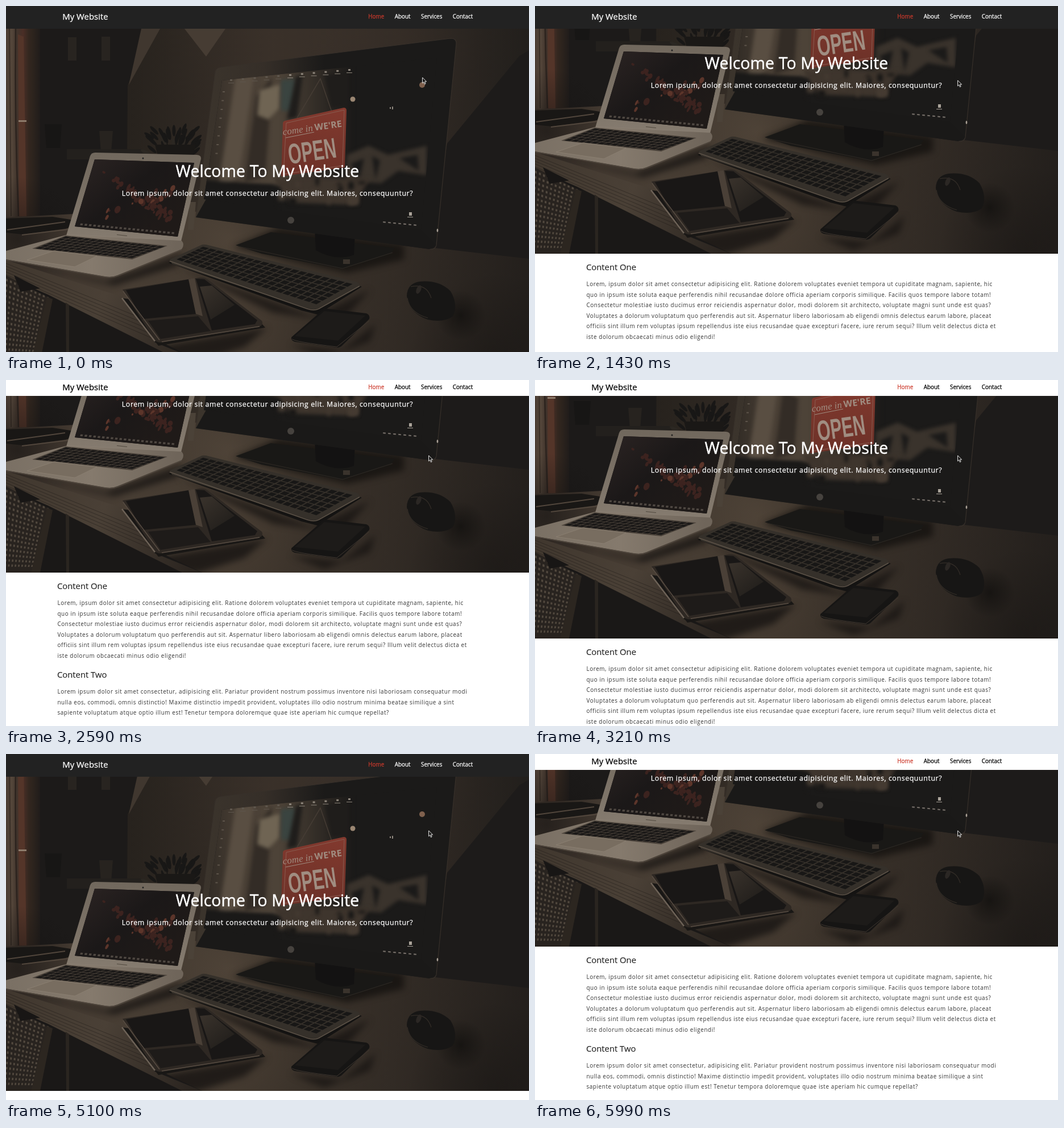
These frames come from a looping animation (920 px wide and 609 px high, 6260 ms). An HTML page with a canvas:

```html
<!DOCTYPE html>
<html lang="en">
<head>
<meta charset="utf-8">
<title>My Website</title>
<style>
html, body { margin: 0; width: 100%; height: 100%; overflow: hidden; background: #fff; }
body { font-family: "Open Sans", "Noto Sans", sans-serif; }
#stage { position: relative; width: 920px; height: 609px; overflow: hidden; background: #fff; }
#page { position: absolute; left: 0; top: 0; width: 920px; height: 920px; }
#photo { position: absolute; left: 0; top: 0; }
h1, h2, p { position: absolute; margin: 0; font-weight: 400; white-space: nowrap; }
h1, .lead { left: 0; width: 920px; text-align: center; color: #fff; }
h1 { top: 270px; font-size: 28.37px; line-height: 40px; letter-spacing: .13px; -webkit-text-stroke: .45px; }
.lead { top: 320px; font-size: 12.33px; line-height: 20px; letter-spacing: .625px; -webkit-text-stroke: .25px; }
h2 { left: 90px; font-size: 14.8px; line-height: 20px; color: #222; -webkit-text-stroke: .15px; }
.text { left: 90.4px; font-size: 9.87px; line-height: 18.5px; letter-spacing: .617px; color: #333; }
#nav { position: absolute; left: 0; top: 0; width: 920px; overflow: hidden; -webkit-text-stroke: .25px; }
#bar { position: absolute; left: 0; top: 0; width: 920px; height: 40px; }
.logo { position: absolute; left: 99.3px; top: 8px; font-size: 14.8px; line-height: 20px; letter-spacing: .05px; }
.links { position: absolute; left: 637.3px; top: 7.5px; display: flex; gap: 18.5px; font-size: 9.87px; line-height: 20px; }
.links .current { color: #cc3a2c; }
#cursor { position: absolute; left: 0; top: 0; }
</style>
</head>
<body>
<div id="stage">
  <div id="page">
    <canvas id="photo" width="920" height="626"></canvas>
    <h1>Welcome To My Website</h1>
    <p class="lead">Lorem ipsum, dolor sit amet consectetur adipisicing elit. Maiores, consequuntur?</p>
    <h2 style="top:639px">Content One</h2>
    <p class="text" style="top:670px">Lorem, ipsum dolor sit amet consectetur adipisicing elit. Ratione dolorem voluptates eveniet tempora ut cupiditate magnam, sapiente, hic<br>quo in ipsum iste soluta eaque perferendis nihil recusandae dolore officia aperiam corporis similique. Facilis quos tempore labore totam!<br>Consectetur molestiae iusto ducimus error reiciendis aspernatur dolor, modi dolorem sit architecto, voluptate magni sunt unde est quas?<br>Voluptates a dolorum voluptatum quo perferendis aut sit. Aspernatur libero laboriosam ab eligendi omnis delectus earum labore, placeat<br>officiis sint illum rem voluptas ipsum repellendus iste eius recusandae quae excepturi facere, iure rerum sequi? Illum velit delectus dicta et<br>iste dolorum obcaecati minus odio eligendi!</p>
    <h2 style="top:795px">Content Two</h2>
    <p class="text" style="top:826px">Lorem ipsum dolor sit amet consectetur, adipisicing elit. Pariatur provident nostrum possimus inventore nisi laboriosam consequatur modi<br>nulla eos, commodi, omnis distinctio! Maxime distinctio impedit provident, voluptates illo odio nostrum minima beatae similique a sint<br>sapiente voluptatum atque optio illum est! Tenetur tempora doloremque quae iste aperiam hic cumque repellat?</p>
  </div>
  <div id="nav"><div id="bar">
    <div class="logo">My Website</div>
    <div class="links"><span class="current">Home</span><span>About</span><span>Services</span><span>Contact</span></div>
  </div></div>
  <svg id="cursor" width="9" height="14"><path d="M.6 .9V10.8L2.9 8.7 4.4 12.5 6.1 11.8 4.6 8.1H7.6Z" fill="#161514" stroke="#fff" stroke-width=".9"/></svg>
</div>
<script>
const $ = id => document.getElementById(id);
const g = $('photo').getContext('2d');

let seed = 7;
const rnd = () => (seed = (seed * 16807) % 2147483647) / 2147483647;

const shape = (fill, d) => { g.fillStyle = fill; g.fill(new Path2D(d)); };
const line = (color, w, d) => { g.strokeStyle = color; g.lineWidth = w; g.stroke(new Path2D(d)); };
const oval = (fill, x, y, rx, ry = rx, a = 0) => {
  g.fillStyle = fill; g.beginPath(); g.ellipse(x, y, rx, ry, a, 0, 7); g.fill();
};
const fade = (x0, y0, x1, y1, ...colors) => {
  const f = g.createLinearGradient(x0, y0, x1, y1);
  colors.forEach((c, i) => f.addColorStop(i / (colors.length - 1), c));
  return f;
};
const glow = (x, y, r, rgb, a) => {
  const f = g.createRadialGradient(x, y, 0, x, y, r);
  f.addColorStop(0, `rgba(${rgb},${a})`);
  f.addColorStop(1, `rgba(${rgb},0)`);
  g.fillStyle = f;
  g.fillRect(x - r, y - r, 2 * r, 2 * r);
};
const within = (d, draw) => { g.save(); g.clip(new Path2D(d)); draw(); g.restore(); };
const soft = (r, draw) => { g.save(); g.filter = `blur(${r}px)`; draw(); g.restore(); };

// Small cells laid out in a four-cornered patch: top left, top right, bottom right, bottom left.
const cells = (q, cols, rows, fill, gap = .18) => {
  const at = (u, v) => [0, 1].map(k =>
    (q[0][k] * (1 - u) + q[1][k] * u) * (1 - v) + (q[3][k] * (1 - u) + q[2][k] * u) * v);
  for (let r = 0; r < rows; r++) for (let c = 0; c < cols; c++) {
    const [l, t, e, b] = [(c + gap) / cols, (r + gap) / rows, (c + 1 - gap) / cols, (r + 1 - gap) / rows];
    shape(fill, 'M' + [at(l, t), at(e, t), at(e, b), at(l, b)].join('L') + 'Z');
  }
};

function drawRoom() {
  g.fillStyle = fade(0, 0, 920, 0, '#1d1a18', '#28231e', '#382f28', '#332b25', '#221f1c');
  g.fillRect(0, 0, 920, 626);
  glow(560, 40, 280, '62,53,45', .35);
  shape('#1c1a19', 'M58 40H250L214 140 212 390H58Z');
  shape('#463c33', 'M314 40H386L352 89Z');
  shape('#40372f', 'M238 40H271L216 139Z');
  shape('#1d1b1a', 'M920 78L903 88 776 242 740 460H920Z');
  // window curtain
  g.fillStyle = fade(0, 0, 60, 0, '#4a3c33', '#55473b', '#40332b', '#4a2e26', '#33271f', '#2a221d', '#201c1a');
  g.fillRect(0, 40, 60, 332);
  shape('#543529', 'M21 50L31 54 36 370H23Z');
  line('#2c231e', 2.5, 'M17 40Q15 200 22 370');
  line('#3a2f27', 2, 'M6 40L9 370');
  shape('#8d7b6b', 'M22 201H36V204H22Z');
  // shelf and cups
  shape('#282420', 'M109 55H124V96H109Z M168 54H183V96H168Z');
  shape('#171615', 'M68 208H98L95 250H71Z');
  shape('#27231f', 'M164 220H188L185 258H167Z');
  shape('#23201d', 'M107 252H240V270H107Z');
  // plant
  for (let i = 0; i < 44; i++) {
    const x = 246 + rnd() * 96, y = 212 + rnd() * 44 + Math.abs(x - 296) * .1;
    oval(i % 5 ? '#181716' : '#2b2722', x, y, 3, 10, (x - 296) / 45);
  }
  shape('#1a1816', 'M262 244H334L322 290H274Z');
}

function drawDesk() {
  shape(fade(0, 400, 920, 520, '#40362e', '#483e34', '#3e352c', '#322b25', '#231f1c'),
    'M0 372L120 366 340 362 720 422 920 445V626H0Z');
  glow(390, 410, 110, '96,82,68', .4);
  glow(400, 545, 150, '84,71,59', .35);
  glow(20, 410, 110, '20,18,17', .6);
  glow(860, 620, 150, '24,21,19', .5);
  shape('#191715', 'M0 374L82 371 140 380 105 392 30 402 0 399Z');
  line('#51463c', 2, 'M2 394L104 380M28 403L110 393');
  // soft shadows under the things on the desk
  soft(6, () => {
    shape('rgba(20,18,16,.75)', 'M10 452L176 484 312 436 300 458 190 492Z');
    shape('rgba(20,18,16,.7)', 'M300 458L540 546 640 500 590 556 470 540Z');
    shape('rgba(20,18,16,.8)', 'M400 424L480 390 700 420 700 446 600 470Z');
    shape('rgba(20,18,16,.75)', 'M260 600L460 566 420 600 340 626H260Z');
    shape('rgba(20,18,16,.7)', 'M500 596L590 606 650 560 640 590 560 620Z');
  });
  // front board, legs, bin
  shape('#1a1817', 'M0 468L60 490 345 626H0Z');
  shape(fade(0, 450, 330, 610, '#40372e', '#4a4036', '#2b2520'), 'M0 447L205 512 262 592 345 626H310L74 508 0 476Z');
  for (let i = 0; i < 5; i++) line('rgba(28,24,21,.45)', 1, `M0 ${453 + i * 5}L${235 + i * 12} ${548 + i * 12}`);
  shape('#28231f', 'M0 474L72 512 46 626H0Z');
  cells([[-2, 476], [78, 512], [54, 618], [-10, 618]], 11, 15, '#51483e', .27);
  shape('#181615', 'M14 474L60 497 26 503Z');
  shape('#2c2620', 'M72 512L82 516 60 626H44Z');
  shape('#2a2520', 'M105 522L111 526V626H106Z');
}

function drawMonitor() {
  shape('#191816', 'M404 421L466 398 683 426 678 436 592 463 450 436Z');
  line('#2e2924', 1.2, 'M408 423L592 462 680 434');
  shape('#131212', 'M543 392L614 400 612 438Q580 450 545 430Z');
  shape('#3a332c', 'M593 446H605V454H593Z');
  const body = 'M334 372L368 116Q370 109 378 108L782 57Q793 57 792 67L757 421Q755 429 745 428Z';
  shape(fade(350, 0, 560, 0, '#3b342c', '#352e28', '#1b1a19'), body);
  line('#37302a', 1.2, 'M334 372L368 116Q370 109 378 108L782 57Q793 57 792 67L757 421Q755 429 745 428');
  shape('#1a1918', 'M352 340L730 394 757 421 745 428 334 372Z');
  const screen = 'M380 131L758 91 730 394 348 340Z';
  shape('#1b1a19', screen);
  within(screen, () => soft(3, () => {
    g.fillStyle = fade(350, 0, 610, 0, '#302a24', '#4a4036', '#4d4338', '#332d27', '#1b1a19');
    g.fillRect(345, 90, 265, 225);
    shape('#594e42', 'M404 125L436 122 410 300 372 330Z');
    shape('#332c26', 'M440 160L468 126 456 300 420 310Z');
    shape('#6f6453', 'M446 148L482 138 480 180 462 200 442 192Z');
    shape('#3a4440', 'M484 130L510 128 506 186 484 184Z');
    shape('#1f1d1b', 'M510 124L522 122 512 196 494 200Z M560 122L600 116V176L572 180Z');
    shape('#3a332c', 'M600 262L638 246 672 262 740 246V298L690 290 660 312 598 308Z');
    shape('#1b1a19', 'M606 278L630 268 622 304Z M644 264L658 272 650 306Z M692 268L724 262 726 290Z');
    shape('#3e352d', 'M470 302L640 304 612 350 500 346Z');
    for (let i = 0; i < 16; i++) {
      g.fillStyle = i % 3 ? '#453b32' : '#171615';
      g.fillRect(470 + rnd() * 150, 300 + rnd() * 40, 4 + rnd() * 14, 3 + rnd() * 12);
    }
    shape('#1a1918', 'M348 306L470 316 480 370 345 342Z');
  }));
  oval('#9a8672', 610, 164, 4.5);
  oval('#80614e', 732, 139, 5);
  shape('#8f877e', 'M675 178H677V181H675Z M679 177H681V182H679Z');
  // desktop icons
  for (let i = 0; i < 11; i++) {
    g.fillStyle = i > 4 ? '#8d857b' : '#5f574e';
    const x = 394 + i * 20.8, y = 132 - i * 1.8;
    g.fillRect(x, y - 3, 4, 3);
    g.fillRect(x - 3, y + 3, 10, 1);
  }
  for (let i = 0; i < 8; i++) {
    g.fillStyle = '#5d544a';
    g.fillRect(381 - i * 1.8, 150 + i * 15.5, 4, 2);
  }
  cells([[661, 378], [724, 384], [724, 388], [661, 382]], 7, 1, '#77706a', .24);
  shape('#aaa39a', 'M709 363H714V369H709Z M706 371H716V372H706Z');
  oval('#aaa196', 759, 395, 1.4, 3);
  oval('#46423e', 501, 377, 6);
}

function drawSign() {
  line('#453c34', 1.5, 'M512 197L553 128 573 186');
  shape(fade(0, 180, 0, 298, '#82392e', '#6c3128'), 'M491 202L594 179Q599 179 599 184L596 284 484 300 487 207Q487 203 491 202Z');
  line('#8a5c50', 1, 'M493 206L595 183 592 281 488 296Z');
  g.save();
  g.translate(540, 236);
  g.rotate(-.14);
  g.fillStyle = '#a08d81';
  g.textAlign = 'center';
  g.font = 'italic 17px "Liberation Serif", serif';
  g.fillText('come in', -24, -16);
  g.font = 'bold 16px "Open Sans", sans-serif';
  g.fillText("WE'RE", 30, -16);
  g.font = 'bold 50px "Liberation Sans", sans-serif';
  g.scale(.6, 1);
  g.fillText('OPEN', -7, 36);
  g.restore();
  line('#a08d81', 1, 'M492 232L542 222');
}

function drawLaptop() {
  shape('#4b4238', 'M322 345H334L330 394H320Z');
  shape(fade(0, 260, 0, 412, '#71685d', '#857b6f'), 'M148 264Q150 258 157 258L336 262Q344 263 343 269L308 414 106 404Z');
  const screen = 'M156 270L331 276 302 406 121 388Z';
  shape('#1a1817', screen);
  within(screen, () => {
    g.fillStyle = fade(150, 270, 260, 400, '#292221', '#1b1818', '#1f1a18');
    g.fillRect(110, 260, 230, 150);
    for (let i = 0; i < 64; i++) {
      const u = rnd(), x = 172 + u * 122, y = (i % 3 ? 290 + u * 76 : 362 - u * 50) + rnd() * 20;
      oval(i % 6 ? '#3c231f' : '#5c352a', x, y, 1.5 + rnd() * 3.5, 2 + rnd() * 5, .5);
    }
  });
  cells([[130, 381], [298, 397], [297, 403], [128, 387]], 22, 1, '#4f4842', .22);
  line('#8a7f73', 1, 'M107 402L308 413');
  oval('#222', 241, 268, 1.5);
  shape('#51483f', 'M195 402L213 404V405L195 403Z');
  shape(fade(0, 430, 300, 430, '#7a7064', '#857a6d', '#6f655a'),
    'M106 403L309 413Q315 420 309 428L196 474Q187 478 174 476L0 446V431Z');
  line('#4e453c', 1.5, 'M0 447L174 477Q187 479 197 475L309 429');
  shape('#4a423a', 'M105 404L284 422 222 446 46 427Z');
  cells([[105, 405], [281, 423], [222, 444], [50, 427]], 15, 6, '#1a1817', .08);
  shape('#786d60', 'M84 431L160 440 121 459 37 447Z');
  line('#8a7f71', 1, 'M84 431L160 440 121 459 37 447Z');
}

function drawGadgets() {
  // keyboard
  shape('#141312', 'M286 452L346 424 626 494 548 543 520 536Z');
  shape('#35302a', 'M288 446L345 420Q350 419 356 421L618 486Q624 489 620 494L550 532Q542 536 530 532L292 454Z');
  line('#5c5247', 1.5, 'M288 449L530 533Q542 537 550 533L622 493');
  cells([[346, 423], [612, 489], [546, 526], [298, 446]], 20, 6, '#181716', .1);
  // tablet in its folio
  shape('#191715', 'M204 514L268 598 456 566 440 548Z');
  shape('#2e2823', 'M205 499L340 478Q350 477 357 483L450 554Q454 562 444 565L274 592Q266 593 261 588Z');
  shape('#191716', 'M211 500L322 481 334 542 240 551Z');
  shape('#4a4037', 'M321 481L332 479 346 546 334 542Z');
  shape('#1e1b19', 'M250 554L338 546 360 572 272 586Z');
  shape('#191716', 'M334 480L349 481 442 553 438 560 362 571Z');
  shape(fade(341, 490, 390, 550, '#3a332c', '#211e1b'), 'M341 494L362 492 402 526 360 552Z');
  line('#6d6257', 2.5, 'M204 514L262 590');
  line('#574c42', 1.5, 'M206 502L270 588M274 591L446 564');
  // phone
  shape('#161514', 'M502 583L556 536Q560 532 566 533L634 541Q641 544 639 551L592 597Q588 602 580 601L508 591Q501 589 502 583Z');
  shape('#1d1b19', 'M508 581L560 537 632 545 584 589Z');
  line('#3f3730', 1, 'M503 586Q506 591 582 600L639 554');
  // mouse
  glow(800, 545, 44, '20,18,16', .85);
  shape('#171615', 'M705 510Q706 488 728 485Q762 482 782 502Q796 526 786 546Q770 558 742 552Q708 540 705 510Z');
  line('#332d27', 1.2, 'M706 514Q710 540 742 549M712 494Q740 488 748 514');
  oval('#2b2724', 726, 499, 4, 8, .4);
}

drawRoom();
drawDesk();
drawMonitor();
drawSign();
drawLaptop();
drawGadgets();

const LOOP = 6260;
// [time, scroll offset]
const scrolls = [
  [0, 0], [800, 2], [980, 55], [1070, 143], [1430, 190], [1520, 201], [1610, 208], [1700, 214],
  [1870, 228], [1960, 239], [2140, 262], [2230, 278], [2320, 287],
  [3130, 235], [3210, 171], [3300, 110], [3390, 62], [3480, 30], [3570, 10], [3660, 0],
  [5010, 10], [5100, 33], [5190, 60], [5370, 100], [5640, 130], [5730, 200], [5820, 245], [5910, 272], [5990, 287]
];
// [time, x, y]
const pointer = [[0, 732, 125], [260, 743, 130], [2140, 743, 131], [2590, 743, 132], [4290, 743, 133], [4650, 743, 134]];

const last = (list, t) => list.reduce((a, b) => b[0] <= t ? b : a);
const ease = (t, from, to) => {
  const p = Math.min(1, Math.max(0, (t - from) / (to - from)));
  return p * p * (3 - 2 * p);
};
const mix = (a, b, p) => a + (b - a) * p;
const gray = v => `rgb(${Math.round(v)},${Math.round(v)},${Math.round(v)})`;

function render(t) {
  const [tick, y] = last(scrolls, t);
  const [, cx, cy] = last(pointer, t);
  const light = ease(tick, 1430, 1700) - ease(tick, 3210, 3480) + ease(tick, 5690, 5980);
  $('page').style.transform = `translateY(${-y}px)`;
  $('cursor').style.transform = `translate(${cx}px,${cy}px)`;
  $('nav').style.height = mix(40, 28, light) + 'px';
  $('nav').style.background = gray(mix(34, 255, light));
  $('nav').style.color = gray(mix(255, 0, light));
  $('bar').style.transform = `translateY(${mix(0, -6, light)}px)`;
}

const start = performance.now();
function loop() {
  render((performance.now() - start) % LOOP);
  requestAnimationFrame(loop);
}
render(0);
requestAnimationFrame(loop);
</script>
</body>
</html>
```
